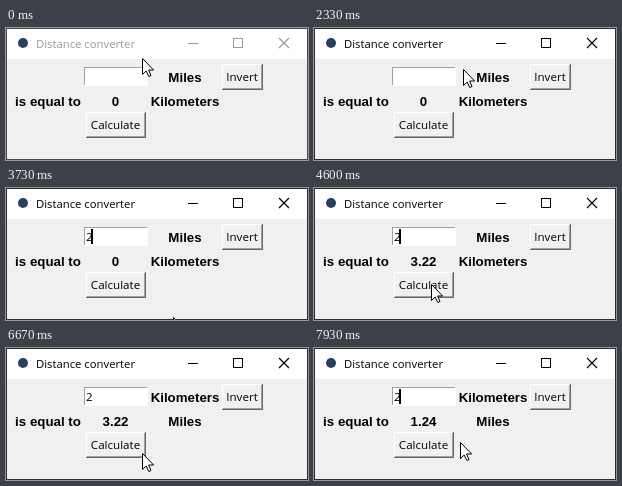
An HTML page that plays this animation: 302 by 132 pixels, repeating every 8000 ms.

```html
<!DOCTYPE html>
<html lang="en">
<head>
<meta charset="utf-8">
<title>Distance converter</title>
<style>
  html, body { margin: 0; height: 100%; overflow: hidden; }
  svg { display: block; shape-rendering: crispEdges; cursor: default; }
  text { font: 11.6px "Open Sans", "Noto Sans", sans-serif; }
  .bold { font: bold 13.3px "Liberation Sans", Arial, sans-serif; text-anchor: middle; }
  .mid { text-anchor: middle; }
  #title { font-size: 11.3px; }
  .smooth { shape-rendering: auto; }
</style>
</head>
<body>
<svg width="302" height="132" viewBox="0 0 302 132">
  <rect id="frame" width="302" height="132"/>
  <rect x="1" y="1" width="300" height="130" fill="#f0f0f0"/>
  <rect x="1" y="1" width="300" height="30" fill="#fff"/>
  <circle class="smooth" cx="17" cy="15" r="5" fill="#24425f"/>
  <text id="title" x="30" y="20">Distance converter</text>
  <rect id="hover" x="256" y="1" width="45" height="29" fill="#e81123"/>
  <path id="sizers" d="M182 15.5h10M227.5 10.5h9v9h-9z" fill="none"/>
  <path id="close" class="smooth" d="M273 10l10 10m0-10l-10 10" fill="none" stroke-width="1.2"/>

  <rect x="78" y="39" width="64" height="19" fill="#fff"/>
  <path d="M78.5 57V39.5H141" fill="none" stroke="#a0a0a0"/>
  <text id="entry" x="80" y="53">2</text>
  <rect id="caret" y="41" width="2" height="15"/>

  <text class="bold" id="from" x="179" y="54"></text>
  <text class="bold" x="42" y="78">is equal to</text>
  <text class="bold" id="result" x="109.5" y="78"></text>
  <text class="bold" id="to" x="179" y="78"></text>
  <g id="calculate"></g>
  <g id="invert"></g>

  <path id="arrow" class="smooth" d="M.5 .5V16.5L4.2 13L6.8 18.5L9 17.5L6.6 12H11.6Z" fill="#fff" stroke="#000"/>
  <path id="beam" d="M-3 -6.5h2.5M.5 -6.5h3M-3 7.5h2.5M.5 7.5h3M.5 -6V7" fill="none" stroke="#000"/>
</svg>
<script>
const $ = id => document.getElementById(id);
const set = (id, attrs) => {
  for (const name in attrs) $(id).setAttribute(name, attrs[name]);
};
const show = (id, on) => set(id, { visibility: on ? 'visible' : 'hidden' });
const within = (v, a, b) => v >= a && v < b;

const FPS = 15, LOOP = 8000, HOLD = 130;
const FOCUS = 1470, TYPE = 2730, INVERT = 6270, CALCULATE = [4470, 6800];
const CLOSE_HOVERS = [2400, 2870], HOVER_FADE = 200;

// Pointer trips: start ms, end ms, destination x, y and downward bow
const trips = [
  [0, 130, 133, 35], [200, 400, 180, 33, -20],
  [930, 1400, 130, 40], [1400, 1730, 124, 46],
  [2270, 2530, 310, 12], [2800, 2870, 300, 31], [2870, 2930, 180, 140],
  [3600, 4000, 127, 94], [4130, 4270, 117, 96],
  [5200, 6070, 229, 71, 18], [6070, 6270, 236, 55],
  [6400, 6670, 136, 105], [6670, 6800, 124, 101],
  [7000, 7930, 146, 94, 12]
];

function pointer(t) {
  let x = 136, y = 30;
  for (const [start, end, toX, toY, bow = 0] of trips) {
    if (t <= start) break;
    const k = Math.min(1, (t - start) / (end - start));
    const ease = k * k * (3 - 2 * k);
    x += (toX - x) * ease;
    y += (toY - y) * ease + bow * Math.sin(Math.PI * ease);
  }
  return [Math.round(x), Math.round(y)];
}

// Bevelled button; the light and dark edges swap while pressed
function button(id, label, x, y, w, h, pressed) {
  const edge = (inset, light, dark) => {
    const l = x + inset + .5, t = y + inset + .5;
    const r = x + w - inset - .5, b = y + h - inset - .5;
    const [first, second] = pressed ? [dark, light] : [light, dark];
    return `<path d="M${l} ${b}V${t}H${r}" fill="none" stroke="${first}"/>
      <path d="M${l - .5} ${b}H${r}V${t - .5}" fill="none" stroke="${second}"/>`;
  };
  const shift = pressed ? 1 : 0;
  $(id).innerHTML = edge(0, '#fff', '#696969') + edge(1, '#f0f0f0', '#a0a0a0') +
    `<text class="mid" x="${x + w / 2 - .5 + shift}" y="${y + 17 + shift}">${label}</text>`;
}

function draw(t) {
  const focused = t >= FOCUS, typed = t >= TYPE, swapped = t >= INVERT + HOLD;
  const ink = focused ? '#000' : '#999';
  const held = start => within(t, start, start + HOLD);
  const glow = start => t < start ? 0 : Math.max(0, 1 - (t - start) / HOVER_FADE);
  set('frame', { fill: focused ? '#2b2b2b' : '#484848' });
  set('title', { fill: ink });
  set('sizers', { stroke: ink });
  set('close', { stroke: ink });
  set('hover', { opacity: Math.max(...CLOSE_HOVERS.map(glow)) });

  // Caret: 600 ms on, 300 ms off
  show('caret', focused && (t - FOCUS + 10) % 900 < 600);
  set('caret', { x: typed ? 85 : 79 });
  show('entry', typed);

  const units = ['Miles', 'Kilometers'];
  const sums = CALCULATE.filter(start => t >= start + HOLD).length;
  $('from').textContent = units[+swapped];
  $('to').textContent = units[+!swapped];
  $('result').textContent = ['0', (2 * 1.609).toFixed(2), (2 / 1.609).toFixed(2)][sums];
  button('calculate', 'Calculate', 80, 84, 60, 26, CALCULATE.some(held));
  button('invert', 'Invert', 216, 36, 41, 26, held(INVERT));

  const [x, y] = pointer(t);
  const overEntry = within(x, 78, 142) && within(y, 39, 58);
  show('beam', overEntry);
  show('arrow', !overEntry);
  set(overEntry ? 'beam' : 'arrow', { transform: `translate(${x} ${y})` });
}

// The picture advances at 15 steps a second, on times rounded to 10 ms
let last = -1;
function tick() {
  const time = performance.now() % LOOP;
  const step = Math.min(119, Math.floor((time + 4) * FPS / 1000));
  if (step !== last) draw(Math.round(step * 100 / FPS) * 10);
  last = step;
  requestAnimationFrame(tick);
}
tick();
</script>
</body>
</html>
```
